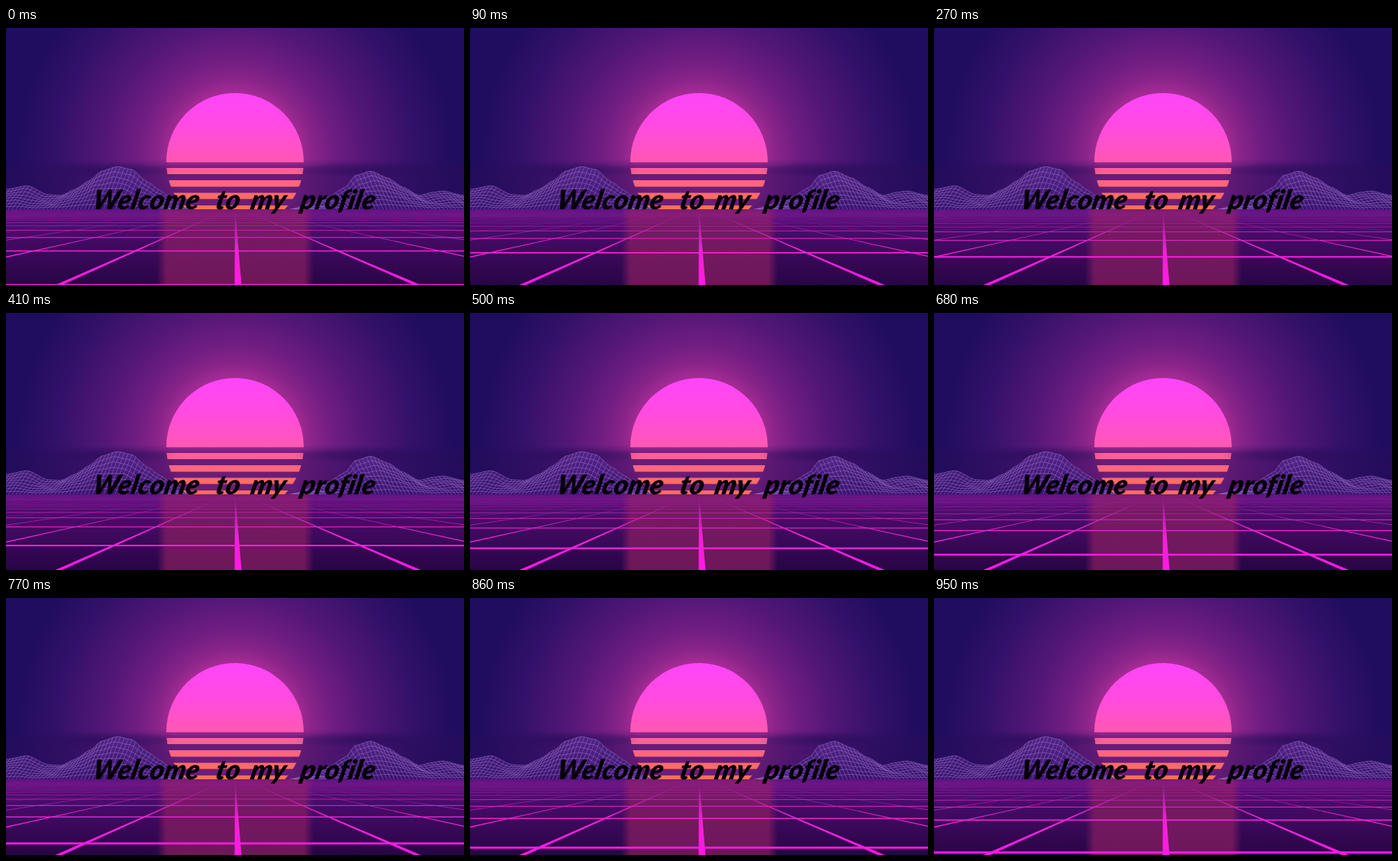
Recreate the animation shown at these times as an HTML page. Size 600 by 336 pixels, loop 0.99 s.

```html
<!DOCTYPE html>
<html lang="en">
<head>
<meta charset="utf-8">
<title>Welcome to my profile</title>
<style>
html, body { margin: 0; width: 100%; height: 100%; overflow: hidden; background: #1f0d60; }
svg { display: block; width: 100%; height: 100%; }
.label { font: italic 900 35.5px Lato, "Open Sans", sans-serif; font-variant-ligatures: none; fill: #07000b; }
</style>
</head>
<body>
<svg viewBox="0 0 600 336" preserveAspectRatio="none">
  <defs>
    <radialGradient id="glow" gradientUnits="userSpaceOnUse" cx="300" cy="168" r="285">
      <stop offset=".29" stop-color="#a62c94"/>
      <stop offset=".36" stop-color="#882488"/>
      <stop offset=".45" stop-color="#701d82"/>
      <stop offset=".6" stop-color="#531777"/>
      <stop offset=".82" stop-color="#33116a"/>
      <stop offset="1" stop-color="#200d60"/>
    </radialGradient>
    <linearGradient id="dusk" x2="0" y2="1">
      <stop offset="0" stop-color="#290c5a" stop-opacity="0"/>
      <stop offset=".2" stop-color="#290c5a" stop-opacity=".5"/>
      <stop offset="1" stop-color="#290c5a" stop-opacity=".45"/>
    </linearGradient>
    <radialGradient id="haze">
      <stop offset="0" stop-color="#2c0d5c" stop-opacity=".6"/>
      <stop offset="1" stop-color="#2c0d5c" stop-opacity="0"/>
    </radialGradient>
    <linearGradient id="sun" gradientUnits="userSpaceOnUse" x1="0" y1="85" x2="0" y2="237">
      <stop offset="0" stop-color="#ff45fb"/>
      <stop offset=".3" stop-color="#ff4be0"/>
      <stop offset=".58" stop-color="#ff58b4"/>
      <stop offset=".7" stop-color="#ff628c"/>
      <stop offset=".85" stop-color="#ff6a6c"/>
      <stop offset="1" stop-color="#ff7050"/>
    </linearGradient>
    <clipPath id="bars">
      <path d="M200 80h200v95.500H200zM200 183h200v8H200zM200 199h200v8.500H200zM200 215.500h200v8H200zM200 232h200v5H200z"/>
    </clipPath>
    <linearGradient id="hill" x2="0" y2="1">
      <stop offset="0" stop-color="#55288c"/>
      <stop offset="1" stop-color="#3a1472"/>
    </linearGradient>
    <linearGradient id="floor" x2="0" y2="1">
      <stop offset="0" stop-color="#5a1280"/>
      <stop offset=".35" stop-color="#460b66"/>
      <stop offset="1" stop-color="#280546"/>
    </linearGradient>
    <linearGradient id="shine" x2="1">
      <stop offset="0" stop-color="#8a1f62" stop-opacity="0"/>
      <stop offset=".06" stop-color="#8a1f62" stop-opacity=".7"/>
      <stop offset=".94" stop-color="#8a1f62" stop-opacity=".7"/>
      <stop offset="1" stop-color="#8a1f62" stop-opacity="0"/>
    </linearGradient>
    <linearGradient id="neon" gradientUnits="userSpaceOnUse" x1="0" y1="237" x2="0" y2="336">
      <stop offset="0" stop-color="#a0209a" stop-opacity=".1"/>
      <stop offset=".12" stop-color="#b022a6" stop-opacity=".45"/>
      <stop offset=".3" stop-color="#d022be" stop-opacity=".85"/>
      <stop offset=".55" stop-color="#f022d4"/>
      <stop offset="1" stop-color="#ff18e6"/>
    </linearGradient>
    <clipPath id="ground"><rect y="237" width="600" height="99"/></clipPath>
  </defs>

  <rect width="600" height="336" fill="url(#glow)"/>
  <rect y="172" width="600" height="65" fill="url(#dusk)"/>
  <circle cx="300" cy="175" r="90" fill="url(#sun)" clip-path="url(#bars)"/>
  <ellipse cx="130" cy="186" rx="95" ry="11" fill="url(#haze)"/>
  <ellipse cx="470" cy="186" rx="95" ry="11" fill="url(#haze)"/>
  <g id="hills"></g>

  <g clip-path="url(#ground)">
    <rect y="237" width="600" height="99" fill="url(#floor)"/>
    <rect x="198" y="237" width="205" height="99" fill="url(#shine)"/>
    <path id="rays" fill="url(#neon)"/>
    <path id="rows" fill="url(#neon)"/>
  </g>

  <g class="label" transform="translate(0 236.500) skewX(-12)">
    <text x="112">Welcome</text>
    <text x="273">to</text>
    <text x="319">my</text>
    <text x="384">profile</text>
  </g>
</svg>
<script>
const $ = id => document.getElementById(id);
const HORIZON = 237, VANISH = 233.5, BOTTOM = 336;

// Height of a ridge at x, eased between [x, y] points.
function ridge(pts, x) {
  let i = 0;
  while (i < pts.length - 2 && x > pts[i + 1][0]) i++;
  const [ax, ay] = pts[i], [bx, by] = pts[i + 1];
  const u = Math.min(1, Math.max(0, (x - ax) / (bx - ax)));
  return HORIZON - (ay + (by - ay) * (u + (1 - Math.cos(Math.PI * u)) / 2) / 2);
}

function drawHill(pts, lean) {
  const from = pts[0][0], to = pts[pts.length - 1][0], n = 8, step = 5;
  const at = (x, k) => {
    const v = k / n;
    const px = x + lean * (1 - v) * 22;
    const bump = 3 * Math.sin(x * .17 + k * 1.3) * v * (1 - v);
    const y = HORIZON - ridge(pts, x) * v - bump;
    return px.toFixed(1) + ' ' + y.toFixed(1);
  };
  const top = [];
  let mesh = '';
  for (let x = from; x <= to; x += 3) top.push(x + ' ' + (HORIZON - ridge(pts, x)).toFixed(1));
  for (let k = 1; k <= n; k++) {
    const line = [];
    for (let x = from; x <= to; x += step) line.push(at(x, k));
    mesh += 'M' + line.join('L');
  }
  for (let x = from; x <= to; x += step) {
    const line = [];
    for (let k = 0; k <= n; k++) line.push(at(x, k));
    mesh += 'M' + line.join('L');
  }
  $('hills').innerHTML +=
    `<path d="M${from} ${HORIZON}L${top.join('L')}L${to} ${HORIZON}Z" fill="url(#hill)" opacity=".85"/>` +
    `<path d="${mesh}" fill="none" stroke="#ae84d6" stroke-width=".6" opacity=".68"/>`;
}

drawHill([[-30, 222], [0, 211], [28, 206], [55, 218], [72, 219], [90, 211], [110, 199],
  [125, 187], [146, 181], [165, 185], [185, 201], [203, 213], [220, 226], [240, 237]], -1);
drawHill([[372, 237], [420, 222], [445, 208], [457, 193], [478, 187], [500, 196],
  [520, 208], [541, 219], [558, 215], [572, 213], [600, 219], [630, 228]], 1);

// Lines running to the vanishing point.
let rays = '';
for (let i = -14; i <= 14; i++) {
  const x = 304 + i * 235;
  rays += `M300 ${VANISH}L${x - 4.5} ${BOTTOM}H${x + 4.5}Z`;
}
$('rays').setAttribute('d', rays);

const starts = [0, 50, 90, 140, 180, 230, 270, 320, 360, 410, 450,
  500, 550, 590, 640, 680, 730, 770, 820, 860, 910, 950];
const GAP = .0075;

// Cross lines approach at constant speed: screen drop is the inverse of distance.
function draw(ms) {
  const t = ms % 990;
  let n = starts.length - 1;
  while (starts[n] > t) n--;
  let d = '';
  for (let i = 0; i < 26; i++) {
    const drop = 1 / (.00974 + GAP * (i + 1 - n / starts.length));
    const near = 1 / (.00974 + GAP * (i - n / starts.length));
    for (const v of i ? [drop] : [near, drop]) {
      if (v < 0 || VANISH + v > BOTTOM + 3) continue;
      const h = Math.max(.7, v * .03);
      d += `M0 ${(VANISH + v - h / 2).toFixed(2)}h600v${h.toFixed(2)}H0z`;
    }
  }
  $('rows').setAttribute('d', d);
}

const begin = performance.now();
function tick() {
  draw(performance.now() - begin);
  requestAnimationFrame(tick);
}
tick();
</script>
</body>
</html>
```
